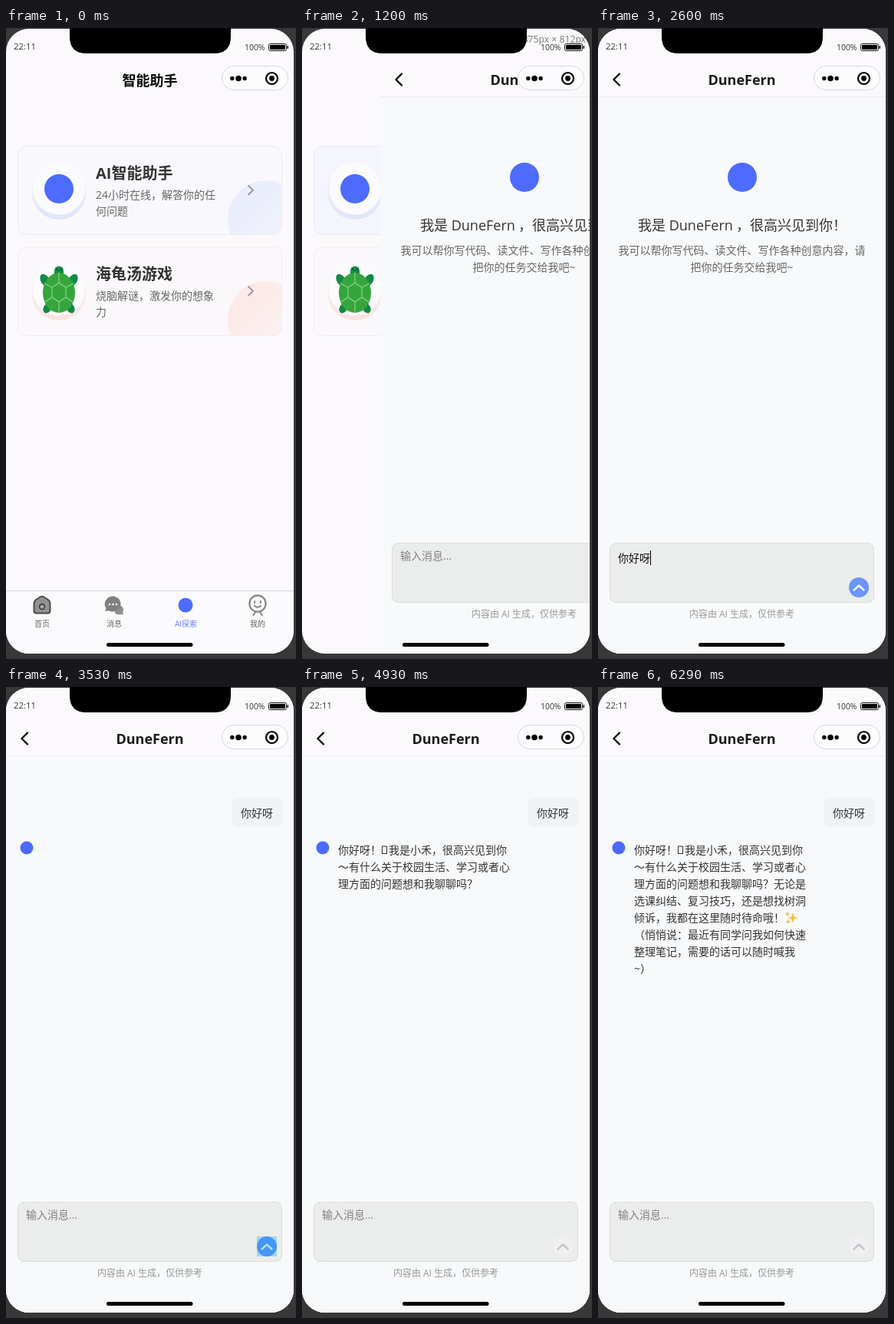
An HTML page for the animation above (8.51 s loop, 378 by 820 pixels).

```html
<!DOCTYPE html>
<html lang="zh-CN">
<head>
<meta charset="utf-8">
<style>
html, body { margin: 0; width: 100%; height: 100%; overflow: hidden; background: #383838; }
svg { display: block; width: 378px; height: 820px; text-spacing-trim: space-all; }
text { font-family: "Open Sans", "Noto Sans CJK SC", "Noto Sans CJK", "Noto Sans", sans-serif; white-space: pre; }
</style>
</head>
<body>
<svg id="stage" viewBox="0 0 378 820" xmlns="http://www.w3.org/2000/svg"></svg>
<script>
const LOOP = 8510;
const BRAND = 'DuneFern';
const BLUE = '#4d6bfe';
const $ = id => document.getElementById(id);

const text = (x, y, s, size = 14, fill = '#333', extra = '') =>
  `<text x="${x}" y="${y}" font-size="${size}" fill="${fill}" ${extra}>${s}</text>`;
const MID = 'text-anchor="middle" ';
const BOLD = 'font-weight="700"';
const rect = (x, y, w, h, r, fill, extra = '') =>
  `<rect x="${x}" y="${y}" width="${w}" height="${h}" rx="${r}" fill="${fill}" ${extra}/>`;
const disc = (x, y, r, fill, extra = '') => `<circle cx="${x}" cy="${y}" r="${r}" fill="${fill}" ${extra}/>`;
const line = (d, stroke, w = 2) =>
  `<path d="${d}" fill="none" stroke="${stroke}" stroke-width="${w}" stroke-linecap="round" stroke-linejoin="round"/>`;

// Gradient used by each card's corner circle and icon shadow
const fade = (id, color, x2, y2, a, b) =>
  `<linearGradient id="${id}" x1="0" y1="0" x2="${x2}" y2="${y2}">
    <stop offset=".3" stop-color="${color}" stop-opacity="${a}"/>
    <stop offset="1" stop-color="${color}" stop-opacity="${b}"/></linearGradient>`;

function card(n, y, look, title, lines, icon) {
  return `<clipPath id="clip${n}">${rect(15, y, 345, 116, 12, '#fff')}</clipPath>
    ${fade('corner' + n, look.corner, 1, 1, 1, .15)}${fade('shade' + n, look.shade, 0, 1, .25, 1)}
    ${rect(15.5, y + .5, 344, 115, 12, look.bg, `stroke="${look.edge}"`)}
    ${n === 1 ? rect(16, y + 1, 343, 114, 11.5, '#eceefb', 'id="tint" opacity="0"') : ''}
    <g clip-path="url(#clip${n})">${disc(339, y + 95, 50, `url(#corner${n})`)}</g>
    ${disc(69, y + 60, 36, `url(#shade${n})`)}${disc(69, y + 55.5, 34, '#fbfafd')}
    ${icon}
    ${text(117, y + 42.5, title, 20, '#333', BOLD)}
    ${lines.map((s, i) => text(117, y + 69 + 21 * i, s, 14, '#666')).join('')}
    ${line(`M316 ${y + 52}l6 5.7-6 5.7`, '#9a9a9f')}`;
}

const limb = (x, y, rx, ry, turn) =>
  `<ellipse cx="${x}" cy="${y}" rx="${rx}" ry="${ry}" fill="#128a45" transform="rotate(${turn} ${x} ${y})"/>`;
const turtle = limb(51, 328, 5.5, 9, -32) + limb(87, 328, 5.5, 9, 32) +
  limb(54, 364, 5, 7, 32) + limb(84, 364, 5, 7, -32) +
  rect(63, 309.5, 12, 17, 6, '#128a45') + disc(66.5, 314, 1, '#0a4a28') + disc(71.5, 314, 1, '#0a4a28') +
  '<ellipse cx="69" cy="344" rx="21" ry="26" fill="#35a63c"/>' +
  line('M69 331l9 6v13l-9 6-9-6v-13zV318M78 337l10-5M78 350l9 6M69 356v14M60 337l-10-5M60 350l-9 6', '#93d48f', 1.1);

const home = `
  ${rect(0, 0, 375, 814, 0, '#fbf9fc')}
  ${text(187.5, 74.5, '智能助手', 18, '#0a0a0a', MID + BOLD)}
  ${card(1, 153, { bg: '#f9f9fd', edge: '#e8eaf4', corner: '#eaedfa', shade: '#dde5f8' }, 'AI智能助手',
    ['24小时在线，解答你的任', '何问题'], disc(69, 209, 19, BLUE))}
  ${card(2, 284, { bg: '#fbf8fb', edge: '#f5ebef', corner: '#fceae9', shade: '#fbe2e0' }, '海龟汤游戏',
    ['烧脑解谜，激发你的想象', '力'], turtle)}`;

const tabs = `
  ${rect(0, 731, 375, 83, 0, '#fbfafc')}${rect(0, 731, 375, 1, 0, '#d3d3d7')}
  <path d="M36.500 748q0-3 2.500-5l5.500-3.500q2.500-1.500 5 0l5.500 3.500q2.500 2 2.500 5v9.500q0 3-3 3h-15q-3 0-3-3z" fill="#929292" stroke="#4b4b4b" stroke-width="2"/>
  ${disc(47, 752, 3.4, '#a8a8a8', 'stroke="#3c3c3c" stroke-width="1.6"')}
  <path d="M146 750a6 6 0 0 1 6 9l1.500 3.500-4-.8a7 7 0 0 1-8-2z" fill="#8e8e8e"/>
  <path d="M139.500 738.500a10.500 10 0 1 1-6 18.500l-4 1 1-4a10.500 10 0 0 1 9-15.500z" fill="#808080"/>
  ${[135, 139.5, 144].map(x => disc(x, 749, 1.3, '#fff')).join('')}
  ${disc(234, 750, 9.5, BLUE)}
  ${disc(328, 748, 10.6, 'none', 'stroke="#858585" stroke-width="2.2"')}
  ${line('M324 745v2M332 745v2M324 751q4 3.500 8 0M322.500 763l2.500-4M333.500 763l-2.500-4', '#858585')}
  ${[[47, '首页'], [141, '消息'], [234.5, 'AI探索'], [328, '我的']].map(([x, s]) =>
    text(x, 777.5, s, 10, x === 234.5 ? '#6a82ff' : '#666', MID)).join('')}`;

const chat = `
  ${rect(0, 0, 375, 814, 0, '#fbf9fc')}${rect(0, 89, 375, 725, 0, '#f7f9fb')}${rect(0, 89, 375, 1, 0, '#e9ebef')}
  ${line('M28 59.500l-7.500 7.500 7.500 7.500', '#111', 2.4)}
  ${text(187.5, 74, BRAND, 18, '#1a1a1a', MID + BOLD)}
  <g id="welcome">
    ${disc(188, 194, 19, BLUE)}
    ${text(52, 263, '我是 ' + BRAND, 18)}${text(180, 263, '，很高兴见到你！', 18)}
    ${text(187.5, 294, '我可以帮你写代码、读文件、写作各种创意内容，请', 14, '#666', MID)}
    ${text(187.5, 316, '把你的任务交给我吧~', 14, '#666', MID)}
  </g>
  <g id="talk">
    ${rect(294, 144, 66, 38, 8, '#f0f3f5')}${text(306, 168.5, '你好呀')}
    ${disc(27, 209, 8.5, BLUE)}
    <g id="reply"></g>
  </g>
  ${rect(15.5, 669.5, 344, 77, 8, '#ebecec', 'stroke="#dcdcdc"')}
  ${text(26, 691, '输入消息...', 14, '#808080', 'id="hint"')}
  ${text(26, 694, '', 14, '#111', 'id="typed"')}
  <line id="under" x1="26" y1="696.500" x2="34" y2="696.500" stroke="#333" stroke-dasharray="1 1"/>
  ${rect(26, 679, 1, 19, 0, '#000', 'id="caret"')}
  ${disc(340, 727, 13, '#f0f0f2', 'id="send"')}
  <path id="arrow" d="M333.500 730.500l6.500-6 6.500 6" fill="none" stroke-width="2.400" stroke-linecap="round" stroke-linejoin="round"/>
  ${rect(327, 714, 26, 26, 0, 'rgb(51,181,229)', 'id="tap"')}
  ${text(187.5, 766, '内容由 AI 生成，仅供参考', 12, '#999', MID)}`;

const chrome = `
  ${text(10, 28, '22:11', 11.3)}${text(311, 29, '100%', 10.4)}
  ${rect(342.5, 20.5, 23, 9, 2, 'none', 'stroke="#111"')}${rect(344, 22, 20, 6, 1, '#000')}${rect(366.5, 23, 1.5, 4, .7, '#111')}
  ${rect(281.5, 49.5, 86, 31, 15.5, '#fcfbfd', 'stroke="#d9d8dd"')}
  ${disc(294.8, 65.5, 2.7, '#000')}${disc(303, 65.5, 3.8, '#000')}${disc(311.2, 65.5, 2.7, '#000')}
  ${disc(346.5, 65.5, 7.5, 'none', 'stroke="#000" stroke-width="2.2"')}${disc(346.5, 65.5, 3.4, '#000')}
  ${text(370, 18.5, '375px × 812px', 12.2, '#777', 'id="size" text-anchor="end"')}
  <path d="M83 0H293V11q0 22-22 22H105q-22 0-22-22z"/>
  ${rect(131, 799, 112.5, 5, 2.5, '#000')}`;

$('stage').innerHTML = `
  <clipPath id="screen">${rect(0, 1, 375, 812, 30, '#fff')}</clipPath>
  <filter id="soft" x="-10%" y="-50%" width="120%" height="220%"><feDropShadow dx="0" dy="3" stdDeviation="3" flood-opacity=".16"/></filter>
  ${rect(0, 0, 378, 820, 0, '#383838')}
  <g clip-path="url(#screen)">${home}<g id="tabs">${tabs}</g><g id="chat">${chat}</g></g>
  ${chrome}
  <g id="popup">
    ${rect(27, 699, 380, 34, 6, '#fbfbfb', 'filter="url(#soft)"')}
    ${rect(30, 703, 63, 26, 4, '#eeeeee', 'id="pick"')}${rect(31, 708.5, 3, 15, 1.5, '#005fb8')}
    <g id="words"></g>
  </g>`;

// Page position: [time, x]
const SLIDE = [[0, 375], [1180, 265], [1200, 102], [1220, 38], [1300, 0]];

// Composition: [time, letters, candidates]
const TYPING = [
  [1960, 'n', '你 呢 那 您 年 能'],
  [2060, 'ni', '你 呢 泥 拟 尼 逆'],
  [2130, "ni'h", '你好 你会 你还 你和 你'],
  [2200, "ni'ha", '你好 你还 你哈 你 呢'],
  [2260, "ni'hao", '你好 拟好 你 呢 泥'],
  [2330, "ni'hao'y", '你好有 你好呀 你好 你'],
  [2400, "ni'hao'ya", '你好呀 你好 你 呢 泥'],
  [2480, '你好呀', '']
];
const SENT = 3510;

// Streamed reply: [time, piece]
const REPLY = [
  [3930, '你好'], [4040, '呀！'], [4150, '□我是小禾'],
  [4310, '，很高兴见到你'], [4420, '\n～有什么关于校园'], [4580, '生活、学习或者'],
  [4800, '心\n理方面的问题'], [4930, '想和我聊聊吗？'], [5040, '无论是\n选课纠结'],
  [5150, '、复习技巧'], [5270, '，还是想找树洞'], [5380, '\n倾诉，我都在这里'],
  [5600, '随时待命'], [5690, '哦！✨'], [5780, '\n（悄悄说：最近'], [5870, '有同学问我'],
  [5960, '如何快速\n整理'], [6050, '笔记，需要的话'], [6210, '可以随时喊我'], [6290, '\n~）']
];

const star = (x, y, r) => {
  const q = r * .22;
  return `<path d="M${x} ${y - r}L${x + q} ${y - q}L${x + r} ${y}L${x + q} ${y + q}L${x} ${y + r}L${x - q} ${y + q}L${x - r} ${y}L${x - q} ${y - q}z" fill="#f6bd3b" stroke="#f6bd3b" stroke-width=".6" stroke-linejoin="round"/>`;
};

function layReply() {
  let x = 47, y = 217, out = '';
  for (const [time, piece] of REPLY) {
    out += `<g data-from="${time}">`;
    for (const part of piece.match(/□|✨|\n|[^□✨\n]+/gu)) {
      if (part === '\n') { x = 47; y += 22; }
      else if (part === '□') { out += rect(x + 1.5, y - 10, 6, 9.5, 0, 'none', 'stroke="#333"'); x += 10; }
      else if (part === '✨') { out += star(x + 11, y - 5, 6) + star(x + 4, y - 10, 2.8) + star(x + 4.5, y, 2.8); x += 19; }
      else { out += text(x, y, part); x += 14 * part.length; }
    }
    out += '</g>';
  }
  $('reply').innerHTML = out;
}
layReply();

const pieces = [...$('reply').children];
const show = (el, on) => { el.style.display = on ? '' : 'none'; };
const ramp = (t, a, b) => Math.min(1, Math.max(0, (t - a) / (b - a)));
const mix = (a, b, k) => `rgb(${a.map((v, i) => Math.round(v + (b[i] - v) * k)).join()})`;
const last = (steps, t) => steps.filter(s => s[0] <= t).pop();

function drawTyping(t) {
  const step = t < SENT ? last(TYPING, t) : null;
  const word = step ? step[1] : '';
  const list = step ? step[2] : '';
  show($('hint'), !word);
  $('typed').textContent = word;
  const end = 26 + (word ? $('typed').getComputedTextLength() : 0);
  show($('under'), list);
  $('under').setAttribute('x2', end);
  $('caret').setAttribute('x', Math.floor(end));
  show($('caret'), t >= 1600 && t < SENT && !(t >= 2820 && t < 3180));
  show($('popup'), list);
  if (!list) return;
  let x = 42;
  $('words').innerHTML = list.split(' ').map((s, i) => {
    const item = text(x, 721, i + 1, 14, '#666') + text(x + 13, 721, s, 14, '#1b1b1b');
    if (!i) $('pick').setAttribute('width', 49 + 14 * s.length);
    x += 52 + 14 * s.length;
    return item;
  }).join('');
}

function draw(t) {
  $('tint').setAttribute('opacity', .35 * ramp(t, 690, 930));
  show($('tabs'), t < 1180);
  show($('size'), t >= 1180 && t < 1300);
  $('chat').setAttribute('transform', `translate(${last(SLIDE, t)[1]} 0)`);
  show($('chat'), t >= 1180);
  show($('welcome'), t < SENT);
  show($('talk'), t >= SENT);
  drawTyping(t);
  const on = t < SENT ? 1 - (1 - ramp(t, 2480, 2690)) ** 2 : 1 - ramp(t, 3520, 3660) ** 1.5;
  $('send').setAttribute('fill', mix([240, 240, 242], [77, 128, 255], on));
  $('arrow').setAttribute('stroke', mix([196, 198, 201], [255, 255, 255], on));
  $('tap').setAttribute('opacity', t < SENT ? 0 : .4 * (1 - ramp(t, 3560, 3660)));
  pieces.forEach(p => show(p, t >= +p.dataset.from));
}

const start = performance.now();
function tick() {
  draw((performance.now() - start) % LOOP);
  requestAnimationFrame(tick);
}
tick();
</script>
</body>
</html>
```
